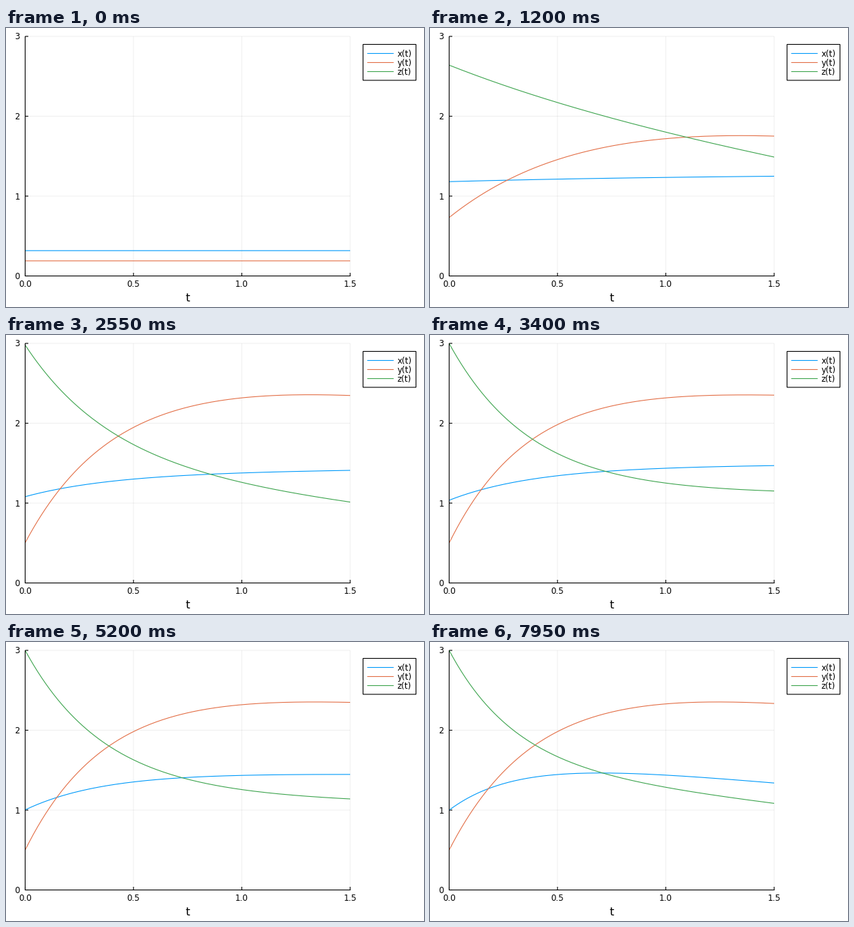
Recreate the animation shown at these times as a matplotlib script. Size 600x400 px, loop 8000 ms.

```python
import numpy as np
import matplotlib.pyplot as plt
from matplotlib.animation import FuncAnimation
from matplotlib.patches import Rectangle

W, H, DPI = 600, 400, 100
STEP, FRAMES = 50, 160
LEFT, RIGHT, TOP, BOTTOM = 27.5, 494, 12, 355.5
T_MAX, V_MAX = 1.5, 3
PX = 72 / DPI

plt.rcParams["font.family"] = "DejaVu Sans"
plt.rcParams["path.snap"] = False
t = np.linspace(0, T_MAX, 160)

# Training stages: start (ms) and the easing that leads to the next one
STAGES = (600, 1800, 3400, 7950)
EASES = (lambda u: u * u * (3 - 2 * u),
         lambda u: 1 - (1 - u) ** 2,
         lambda u: u ** 1.9)


class Series:
    """A fitted solution: level + slope * t, reached exponentially."""

    def __init__(self, name, color, flat, goal, miss, span, shapes):
        self.name, self.color = name, color
        self.flat = flat            # untrained constant output
        self.goal = goal            # initial condition to be learnt
        self.miss, self.span = miss, span   # its error and how long it lasts
        self.shapes = shapes        # (level, slope, rate) for each stage

    def shape(self, stage, start):
        level, slope, rate = self.shapes[stage]
        return level + slope * t + (start - level) * np.exp(-rate * t)

    def at(self, ms):
        start = self.goal + self.miss * np.exp(-(ms / self.span) ** 2)
        i = int(np.clip(np.searchsorted(STAGES, ms, side="right") - 1, 0, 2))
        u = (ms - STAGES[i]) / (STAGES[i + 1] - STAGES[i])
        mix = EASES[i](min(max(u, 0), 1))
        fit = (1 - mix) * self.shape(i, start) + mix * self.shape(i + 1, start)
        return fit + (self.flat - fit) * np.exp(-ms / 115)


SERIES = (
    Series("x", "#009afa", .317, 1, .228, 2500,
           ((1.223, 0, .75), (1.34, 0, .75),
            (1.454, .017, 2.5), (1.711, -.244, 3.2))),
    Series("y", "#e36f47", .189, .5, .79, 1084,
           ((1.096, .058, 1.4), (4.024, -.838, 1.4),
            (2.607, -.145, 2.68), (2.826, -.285, 2.4))),
    Series("z", "#3da44e", -.12, 3, -.81, 1333,
           ((2.342, -.011, 1), (1.676, -.87, 1),
            (1.115, 0, 2.63), (1.548, -.316, 3.3))),
)


def to_x(time):
    return LEFT + time / T_MAX * (RIGHT - LEFT)


def to_y(value):
    return BOTTOM - value / V_MAX * (BOTTOM - TOP)


fig = plt.figure(figsize=(W / DPI, H / DPI), dpi=DPI, facecolor="white")
ax = fig.add_axes([0, 0, 1, 1])
ax.set_xlim(0, W)
ax.set_ylim(H, 0)
ax.axis("off")


def segment(x0, y0, x1, y1, color="black", **style):
    ax.plot([x0, x1], [y0, y1], color=color, lw=1.1 * PX,
            solid_capstyle="butt", **style)


def label(x, y, text, size=8.6, ha="center"):
    ax.text(x, y, text, fontsize=size, ha=ha, va="baseline")


for k in range(4):
    gx, gy = to_x(k / 2), to_y(k)
    segment(gx, TOP, gx, BOTTOM, alpha=.06, zorder=1)
    segment(LEFT, gy, RIGHT, gy, alpha=.06, zorder=1)
    segment(gx, BOTTOM, gx, BOTTOM - 4.5, zorder=2)
    segment(LEFT, gy, LEFT + 4.5, gy, zorder=2)
    label(gx, 371.4, f"{k / 2:.1f}")
    label(20, gy + 4.5, str(k), ha="right")
segment(LEFT, TOP, LEFT, BOTTOM + .5, zorder=2)
segment(LEFT - .5, BOTTOM, RIGHT + .5, BOTTOM, zorder=2)
label((LEFT + RIGHT) / 2, 392, "t", size=11.8)

ax.add_patch(Rectangle((512.5, 23.5), 76, 51.5, fc="white", ec="black",
                       lw=1.1 * PX))
area = Rectangle((LEFT, TOP), RIGHT - LEFT, BOTTOM - TOP,
                 transform=ax.transData)
lines = []
for k, series in enumerate(SERIES):
    row = 36.5 + 13 * k
    segment(518.5, row, 556.5, row, color=series.color)
    label(561.5, row + 4.3, f"{series.name}(t)", ha="left")
    line, = ax.plot([], [], color=series.color, lw=1.1 * PX, zorder=3 + k)
    line.set_clip_path(area)
    lines.append(line)


def draw(frame):
    for line, series in zip(lines, SERIES):
        line.set_data(to_x(t), to_y(series.at(frame * STEP)))
    return lines


anim = FuncAnimation(fig, draw, frames=FRAMES, interval=STEP, repeat=True,
                     repeat_delay=0, blit=False)
plt.show()
```
